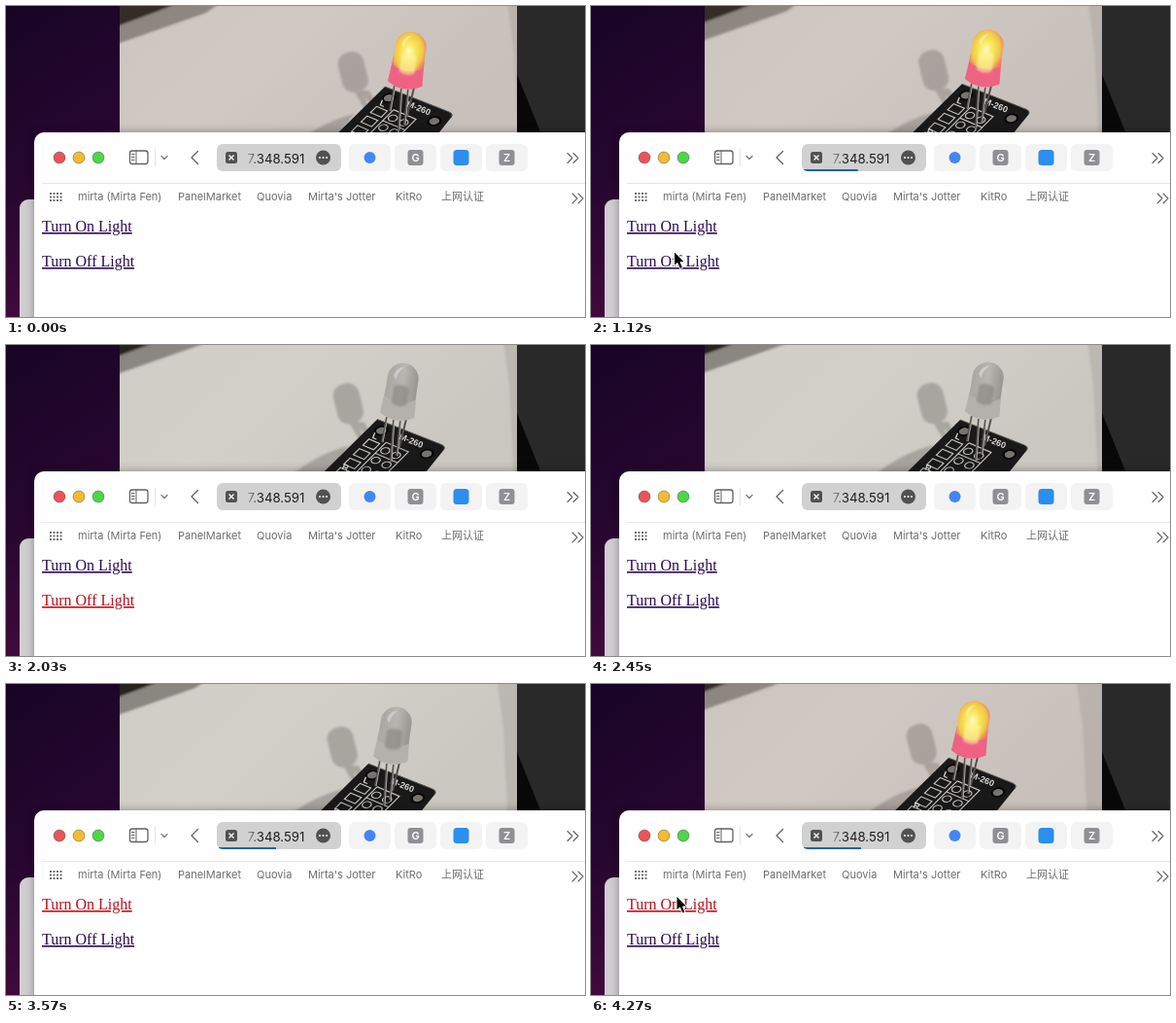
Animation, 596 px wide and 320 px high, one loop 4.34 s. Source, as an HTML page:

```html
<!DOCTYPE html>
<html lang="en">
<head>
<meta charset="utf-8">
<title>Light switch</title>
<style>
  html, body { margin: 0; width: 100%; height: 100%; overflow: hidden; background: #17051f; }
  svg { display: block; }
  .ui { font: 11px Inter, "Noto Sans CJK SC", "Noto Sans CJK", sans-serif; fill: #6d6d6d; }
  .link { font: 16px "Liberation Serif", Times, serif; text-decoration: underline 1px; text-underline-offset: 2px; }
  .icon { fill: none; stroke: #626262; stroke-width: 1.3; stroke-linecap: round; stroke-linejoin: round; }
  .print { fill: none; stroke: #c9c7c2; stroke-width: 1.2; }
  .label { font: bold 9px "Liberation Sans", Arial, sans-serif; fill: #dddbd6; }
</style>
</head>
<body>
<svg width="596" height="320" viewBox="0 0 596 320">
  <defs>
    <linearGradient id="desk" x2=".25" y2="1">
      <stop stop-color="#170526"/><stop offset=".55" stop-color="#26062f"/><stop offset="1" stop-color="#430a3d"/>
    </linearGradient>
    <linearGradient id="paper" x2="1" y2=".35">
      <stop stop-color="#d0cdc7"/><stop offset=".45" stop-color="#d3d0ca"/><stop offset="1" stop-color="#cac7c1"/>
    </linearGradient>
    <radialGradient id="glow" cx=".46" cy=".5" r=".6">
      <stop stop-color="#fffbc0"/><stop offset=".4" stop-color="#f8e552"/>
      <stop offset=".75" stop-color="#f0c64a"/><stop offset="1" stop-color="#ee7a66"/>
    </radialGradient>
    <linearGradient id="dim">
      <stop stop-color="#a9a6a2"/><stop offset=".5" stop-color="#b9b6b2"/><stop offset="1" stop-color="#989591"/>
    </linearGradient>
    <linearGradient id="fade" gradientUnits="userSpaceOnUse" x1="246" x2="262">
      <stop stop-color="#1c1c1c" stop-opacity=".15"/><stop offset="1" stop-color="#1c1c1c"/>
    </linearGradient>
    <filter id="soft" x="-30%" y="-30%" width="160%" height="160%"><feGaussianBlur stdDeviation="1.3"/></filter>
    <filter id="drop" x="-10%" y="-20%" width="120%" height="140%"><feGaussianBlur stdDeviation="5"/></filter>
    <clipPath id="frame"><path d="M117 0H526V131H117Z"/></clipPath>
    <clipPath id="field"><rect x="217" y="142" width="128" height="28" rx="6"/></clipPath>
  </defs>

  <path fill="url(#desk)" d="M0 0H120V320H0Z"/>
  <path fill="#292929" d="M526 0H596V140H526Z"/>
  <path fill="#080808" d="M526 70L551 132H526Z"/>

  <g clip-path="url(#frame)">
    <path fill="url(#paper)" d="M117 0H526V131H117Z"/>
    <g id="shade">
      <g filter="url(#soft)">
        <path fill="#8a8680" d="M90 -30H240L200 -1L100 34Z"/>
        <path fill="#25221f" d="M90 -30H220L146 -1L100 16Z"/>
        <path fill="#a9a59f" d="M509 -20L517 40L522 140H550V-20Z" opacity=".5"/>
        <path fill="#8c8985" opacity=".6" d="M292 134Q318 112 352 103L330 135Z"/>
      </g>
      <g filter="url(#soft)" fill="#98958f" opacity=".7">
        <rect x="-13" y="-22" width="27" height="42" rx="12" transform="translate(351 61) rotate(-14)"/>
        <path d="M352 79L368 79L378 99L374 99L363 85L369 103H366Z"/>
      </g>
    </g>
    <path id="tint" fill="#ba8c86" d="M117 0H526V131H117Z"/>
    <g id="board">
      <path fill="#191919" d="M380 77L446 103Q451 105 448 109L419 145H311Z"/>
      <path fill="none" stroke="#55534f" d="M380 77L446 103Q451 105 448 109"/>
      <g class="print" id="pads" transform="matrix(.92 .39 -.7 .7 380 77)"></g>
      <text class="label" transform="translate(402 97) rotate(22)">M-260</text>
      <text class="label" transform="translate(374 96) rotate(22)">L</text>
      <text class="label" transform="translate(343 128) rotate(22)">R</text>
    </g>
    <g id="led">
      <g fill="none" stroke-width="2">
        <path stroke="#55524e" d="M392 73L387 99M399 76L396 119M406 77L402 113M412 75L405 104"/>
        <path stroke="#c6c3bd" stroke-width=".8" d="M393 73L388 99M400 76L397 119M407 77L403 113"/>
      </g>
      <g transform="translate(403 69) rotate(9)">
        <path id="base" d="M-16 -24H16L18 2Q0 13 -18 2Z"/>
        <path id="dome" d="M-16 -16V-36A16 16 0 0 1 16 -36V-16Q0 -6 -16 -16Z"/>
        <path id="core" d="M-8 -10V-27Q0 -32 8 -27V-10Q0 -5 -8 -10Z" opacity=".6" filter="url(#soft)"/>
        <path fill="#fff" opacity=".35" d="M-10 -38Q-8 -47 0 -48Q-6 -43 -7 -34Z"/>
      </g>
    </g>
  </g>

  <rect x="14" y="199" width="60" height="140" rx="9" fill="#d0ced1"/>
  <rect x="29" y="130" width="600" height="220" rx="10" opacity=".35" filter="url(#drop)"/>
  <rect x="29" y="130" width="600" height="220" rx="10" fill="#fff"/>
  <path fill="#e6e6e6" d="M37 182H596V183H37Z"/>

  <g stroke-opacity=".3" stroke="#000">
    <circle cx="55" cy="156" r="6" fill="#e9545a"/>
    <circle cx="75" cy="156" r="6" fill="#f3bb32"/>
    <circle cx="95" cy="156" r="6" fill="#4fd548"/>
  </g>
  <g class="icon">
    <rect x="127.5" y="149" width="18.500" height="13.500" rx="2.500"/>
    <path d="M134 149V162.500M129.500 152.500H132M129.500 155.500H132M129.500 158.500H132" stroke-width="1"/>
    <path d="M153.500 147V165" stroke="#e6e6e6" stroke-width="1"/>
    <path d="M160 154.500L163 157.500L166 154.500" stroke="#7a7a7a"/>
    <path d="M197.500 149.500L191 156L197.500 162.500"/>
    <path id="more" d="M578 151.500L583 156.500L578 161.500M584 151.500L589 156.500L584 161.500" stroke-width="1.100"/>
    <use href="#more" x="5" y="41.500"/>
  </g>

  <g clip-path="url(#field)">
    <path fill="#d1d1d1" d="M217 142H345V170H217Z"/>
    <rect id="bar" x="219" y="168" height="2" fill="#1f62b5"/>
  </g>
  <rect x="226" y="150" width="12" height="12" rx="2.500" fill="#515151"/>
  <path stroke="#fff" stroke-width="1.300" d="M229.500 153.500L234.500 158.500M234.500 153.500L229.500 158.500"/>
  <text class="ui" x="248.500" y="161.500" style="font-size:13.200px;fill:url(#fade)">7.348.591</text>
  <circle cx="326.500" cy="156" r="7.500" fill="#515151"/>
  <path stroke="#fff" stroke-width="2" stroke-linecap="round" stroke-dasharray="0 3.500" d="M323 156H331"/>

  <g id="tabs"></g>
  <g id="marks" class="ui"></g>
  <text id="on" class="link" x="37" y="232">Turn On Light</text>
  <text id="off" class="link" x="37" y="268">Turn Off Light</text>

  <g stroke-linejoin="round">
    <path id="arrow" stroke="#fff" d="M0 0V15L3.500 12L6 18L9 16.700L6.500 11H11Z"/>
    <path id="hand" fill="#fff" stroke="#111" stroke-width="1.200"
      d="M4 11V2Q5 0 6.500 2V7Q8 5.500 9 7.500Q10.500 6 11.500 8.500Q13.500 7.500 14 10V13L12 18H5L0 11Q0 8 4 11ZM6.500 7V10M9 7.500V10M11.500 8.500V10.500M7 13V16M9.500 13V16"/>
  </g>
</svg>
<script>
const LOOP = 4340, STEP = 70;
const LINK = "#2c0a52", ACTIVE = "#b8101d";
const $ = id => document.getElementById(id);
const set = (id, attrs) => Object.entries(attrs).forEach(([k, v]) => $(id).setAttribute(k, v));
const within = (t, a, b) => t >= a && t < b;

// Keys are [time, ...values]; linear between them, held at the ends.
function at(keys, t) {
  const i = keys.findIndex(k => k[0] > t);
  if (i === 0) return keys[0].slice(1);
  if (i < 0) return keys.at(-1).slice(1);
  const a = keys[i - 1], b = keys[i], u = (t - a[0]) / (b[0] - a[0]);
  return a.slice(1).map((v, n) => v + (b[n + 1] - v) * u);
}

const sway = {
  led: [[0, 8, 9], [630, 0, 11], [1680, 0, 2], [2450, 0, 0], [2940, 0, 0], [3570, -7, 6], [4270, -14, 0]],
  board: [[0, 10, 6], [630, 0, 7], [1680, 4, -1], [2450, 0, 0], [2940, 0, 0], [3570, -7, 5], [4270, -12, -1]],
  shade: [[0, 6, 8], [630, 1, 11], [1680, 2, 1], [2450, 0, 0], [2940, 0, 0], [3570, -5, 5], [4270, -11, 2]]
};

const pointers = [
  { from: 980, to: 1820, keys: [[980, 113, 249], [1260, 58, 256], [1540, 94, 262]], hand: t => t >= 1260 },
  { from: 3080, to: 3430, keys: [[3080, 88, 218], [3360, 15, 219]], hand: t => t < 3220 },
  { from: 3640, to: LOOP, keys: [[3640, 15, 219], [3920, 88, 218]], hand: () => false }
];

function progress(t) {
  if (within(t, 490, 1890)) return at([[490, 14], [630, 31], [1680, 84]], t)[0];
  return t >= 3430 ? at([[3430, 25], [3570, 59]], t)[0] : 0;
}

function draw(now) {
  const t = Math.floor(now % LOOP / STEP) * STEP;
  const lit = !within(t, 1400, 3780);
  for (const id in sway) set(id, { transform: `translate(${at(sway[id], t)})` });
  set("tint", { opacity: lit ? .1 : 0 });
  set("dome", { fill: lit ? "url(#glow)" : "url(#dim)" });
  set("base", { fill: lit ? "#ee6283" : "#b4b1ad" });
  set("core", { fill: lit ? "#fff6a8" : "#85827d" });
  set("bar", { width: progress(t) });

  const pressed = within(t, 210, 490) || within(t, 1820, 2100);
  set("on", { fill: t >= 2870 ? ACTIVE : LINK });
  set("off", { fill: pressed ? ACTIVE : LINK });

  const p = pointers.find(p => within(t, p.from, p.to));
  const hand = p && p.hand(t);
  set("hand", { visibility: hand ? "visible" : "hidden" });
  set("arrow", { visibility: p && !hand ? "visible" : "hidden" });
  if (p) set(hand ? "hand" : "arrow", { transform: `translate(${at(p.keys, t)})` });
  requestAnimationFrame(draw);
}

function tab(x, mark) {
  return `<rect x="${x}" y="142" width="43" height="28" rx="6" fill="#f3f3f3"/>` + mark(x + 21.5);
}
const letter = c => x => `<rect x="${x - 8}" y="148" width="16" height="16" rx="3" fill="#8f8f94"/>
  <text class="ui" x="${x}" y="160" text-anchor="middle" style="font-weight:600;fill:#fff">${c}</text>`;
const disc = x => `<circle cx="${x}" cy="156" r="6" fill="#4285f4"/>`;
const tile = x => `<rect x="${x - 8}" y="148" width="16" height="16" rx="3.5" fill="#2c8eee"/>`;
$("tabs").innerHTML = [disc, letter("G"), tile, letter("Z")].map((m, i) => tab(353 + 47 * i, m)).join("");

const marks = [[74, "mirta (Mirta Fen)"], [177, "PanelMarket"], [258, "Quovia"],
  [311, "Mirta's Jotter"], [401, "KitRo"], [448, "上网认证"]];
let html = marks.map(([x, s]) => `<text x="${x}" y="200">${s}</text>`).join("");
for (let i = 0; i < 12; i++)
  html += `<rect x="${45 + i % 4 * 3.5}" y="${192 + (i >> 2) * 3.5}" width="2" height="2"/>`;
$("marks").innerHTML = html;

// Mounting holes, then rows of solder pads in the board's own axes.
const hole = (x, y) => `<circle cx="${x}" cy="${y}" r="5.5" fill="#77746f" stroke="#050505" stroke-width="2"/>`;
let pads = hole(12, 10) + hole(66, 14);
for (let y = 24; y < 80; y += 14) {
  pads += `<rect x="9" y="${y}" width="12" height="9"/>`;
  for (const x of [31, 43]) pads += `<circle cx="${x}" cy="${y + 5}" r="4"/>`;
}
$("pads").innerHTML = pads + `<path d="M25 20H50V80M25 20V80M25 36H50"/>`;

requestAnimationFrame(draw);
</script>
</body>
</html>
```
